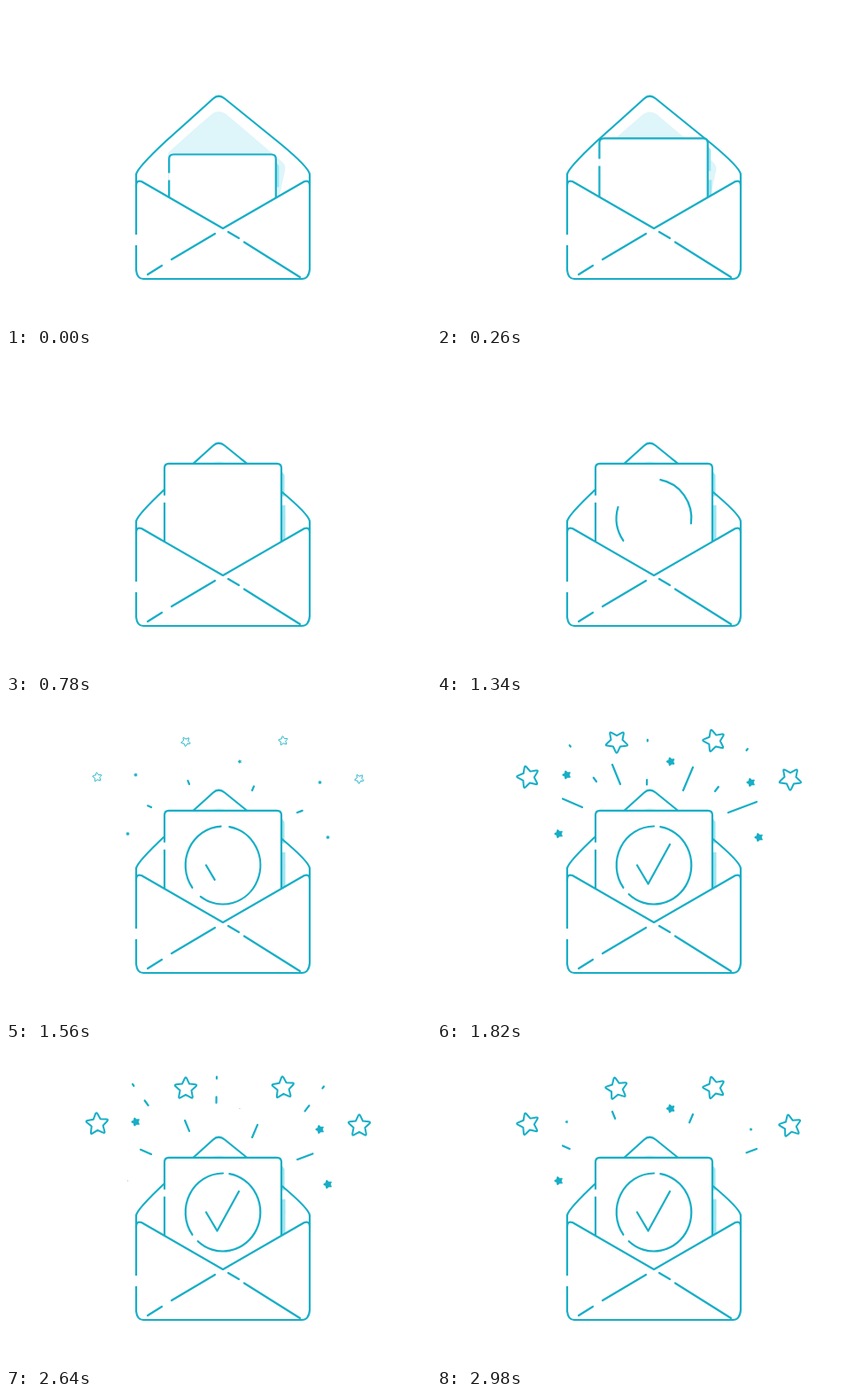
An HTML page for the animation above (3 s loop, 480 px wide and 360 px high).

```html
<!DOCTYPE html>
<html lang="en">
<head>
<meta charset="utf-8">
<title>Letter</title>
<style>
  html, body { margin: 0; width: 100%; height: 100%; overflow: hidden; background: #fff; }
  svg { display: block; width: 100%; height: 100%; }
  .line { fill: none; stroke: #17aec6; stroke-width: 2.2; stroke-linecap: round; stroke-linejoin: round; }
  .flat { stroke-linecap: butt; }
  .white { fill: #fff; }
  .star { stroke-width: 2; }
  .spark { fill: #17aec6; stroke: #17aec6; stroke-width: 1; stroke-linejoin: round; }
</style>
</head>
<body>
<svg id="stage" viewBox="0 0 480 360">
  <path id="lining" fill="#def5fa" d="M183 214V166L187 162Q210 141 233 121.500Q240 116.500 248 121.500L311 175Q317 180 315 186L309 214Z"/>
  <path id="shade" fill="#9ce5f0"/>
  <path class="line" d="M147 204V190Q148 183 180 153Q207 129 234 104.500Q240 99 247 104.500L310 155.500Q342 182 343 190V204"/>
  <path id="sheet" class="white"/>
  <path id="edge" class="line flat"/>
  <path class="white" d="M147 203Q147 196 153 198L245 251L337 198Q343 196 343 203V308H147Z"/>
  <path class="line flat" d="M147 258V203Q147 196 153 198L245 251L337 198Q343 196 343 203V297Q342 308 334 308H155Q148 308 147 298V270"/>
  <path class="line" d="M236 257L187 286M176 293L160 303M251 255L263 262M269 266.500L332 306"/>
  <g id="seal"></g>
  <g id="burst"></g>
</svg>
<script>
const LOOP = 3000, BEAT = 1160;
const $ = id => document.getElementById(id);
const clamp = x => Math.max(0, Math.min(1, x));
const mix = (a, b, k) => a + (b - a) * k;
const span = (t, a, b) => clamp((t - a) / (b - a));
const smooth = k => k < .5 ? 4 * k ** 3 : 1 - 4 * (1 - k) ** 3;
const soft = k => k * k * (3 - 2 * k);
const rad = deg => deg * Math.PI / 180;
// Swings between 0 and 1, reaching 1 at the peak time
const rock = (t, peak, period) => (1 + Math.cos((t - peak) / period * 2 * Math.PI)) / 2;

function add(parent, cls, d = "") {
  const p = document.createElementNS("http://www.w3.org/2000/svg", "path");
  p.setAttribute("class", cls);
  p.setAttribute("d", d);
  parent.append(p);
  return p;
}

// Five-pointed star with rounded tips
function starPath(outer, inner) {
  const pt = i => {
    const a = rad(i * 36 - 90), r = i % 2 ? inner : outer;
    return [r * Math.cos(a), r * Math.sin(a)];
  };
  const near = (p, q) => [mix(p[0], q[0], .72), mix(p[1], q[1], .72)];
  const str = p => p.map(v => v.toFixed(2)).join(" ");
  let d = "";
  for (let i = 0; i < 10; i += 2) {
    const tip = pt(i), a = pt(i + 9), b = pt(i + 1);
    d += `${i ? "L" : "M"}${str(near(a, tip))}Q${str(tip)} ${str(near(b, tip))}L${str(b)}`;
  }
  return d + "Z";
}

const arcs = [[-80, 132], [145, 270]].map(([from, to]) => ({ from, to, el: add($("seal"), "line") }));
const tick = add($("seal"), "line");

const stars = [[103, 87], [203, 47], [313, 46], [399, 89]]
  .map(([x, y]) => ({ x, y, el: add($("burst"), "line star", starPath(14, 6.8)) }));

// x, y, time of the dip
const sparks = [
  [146.5, 84.5, 3060], [264, 69.5, 2620], [354.5, 93, 3060], [137.5, 151, 2620], [363.5, 155, 2970]
].map(([x, y, dip]) => ({ x, y, dip, el: add($("burst"), "spark", starPath(5, 2.7)) }));

// Inner and outer end of each ray
const makeRays = list => list.map(ends => ({ ends, el: add($("burst"), "line") }));
const shortRays = makeRays([[207, 95, 198, 73], [278, 102, 289, 76], [164, 121, 142, 111.5], [329, 127, 361, 115]]);
const longRays = makeRays([[180, 92, 143, 42], [237, 95.5, 238, 33.5], [314, 103, 359, 44.5]]);

// Shows the stretch a..b of every part of each ray
function trim(rays, parts, a, b) {
  for (const { ends: [x, y, u, v], el } of rays) {
    const at = k => `${mix(x, u, k)} ${mix(y, v, k)}`;
    el.setAttribute("d", b - a < .005 ? "" :
      parts.map(([p, q]) => `M${at(mix(p, q, a))}L${at(mix(p, q, b))}`).join(""));
  }
}

function drawLetter(t) {
  const grow = smooth(span(t, 0, 780));
  const top = mix(167.5, 122.7, smooth(span(t, 0, 560))) + 2.1 * soft(span(t, 500, 780));
  const l = mix(184.2, 179, grow), r = mix(304.8, 311, grow);
  const gap = top + mix(21, 36, grow);
  const head = `V${top + 5}Q${l} ${top} ${l + 5} ${top}H${r - 5}Q${r} ${top} ${r} ${top + 5}V245`;
  $("sheet").setAttribute("d", `M${l} 245${head}Z`);
  $("edge").setAttribute("d", `M${l} ${gap}${head}M${l} ${gap + 8}V245`);
  const low = Math.min(top + 47, 214);
  $("shade").setAttribute("d",
    `M${r} ${top + 8}L${r + 3.5} ${top + 13}V${top + 37}H${r}ZM${r} ${low}H${r + 4.5}V214H${r}Z`);
  $("lining").setAttribute("transform", `translate(0 ${3 * grow})`);
}

function drawSeal(t) {
  const p = span(t, BEAT, 1580), k = mix(p, soft(p), .5);
  const at = deg => `${245 + 42.3 * Math.cos(rad(deg))} ${186.5 + 44 * Math.sin(rad(deg))}`;
  for (const { from, to, el } of arcs) {
    const end = mix(from, to, k);
    el.setAttribute("d", k ? `M${at(from)}A42.3 44 0 ${end - from > 180 ? 1 : 0} 1 ${at(end)}` : "");
  }
  const c = soft(span(t, 1480, 1720));
  const a = clamp(c / .34), b = clamp((c - .34) / .66);
  tick.setAttribute("d", c ? `M226 186.500L${mix(226, 238.5, a)} ${mix(186.5, 207.5, a)}` +
    (b ? `L${mix(238.5, 263, b)} ${mix(207.5, 163, b)}` : "") : "");
}

function place(el, x, y, scale, turn) {
  el.style.display = scale < .08 ? "none" : "";
  el.setAttribute("transform", `translate(${x} ${y}) rotate(${turn}) scale(${scale})`);
}

function drawBurst(t) {
  const pop = soft(span(t, 1480, 1660));
  const quick = -16 * rock(t, 1870, BEAT), slow = -36 * rock(t, 1760, 1760);
  stars.forEach(({ x, y, el }, i) => place(el, x, y, pop, i % 2 ? slow : quick));
  for (const { x, y, dip, el } of sparks) {
    place(el, x, y, pop * clamp(Math.abs(t - dip) / 220), -18);
  }
  const reach = span(t, 1480, 1800) * mix(.28, 1, rock(t, 1820, BEAT));
  trim(shortRays, [[0, 1]], span(t, 2640, 3170), reach);
  trim(longRays, [[0, .63], [.79, 1]], span(t, 2300, 2710), span(t, 1760, 2210));
}

function frame() {
  const t = performance.now() % LOOP;
  drawLetter(t);
  drawSeal(t);
  drawBurst(t);
  requestAnimationFrame(frame);
}
frame();
</script>
</body>
</html>
```
